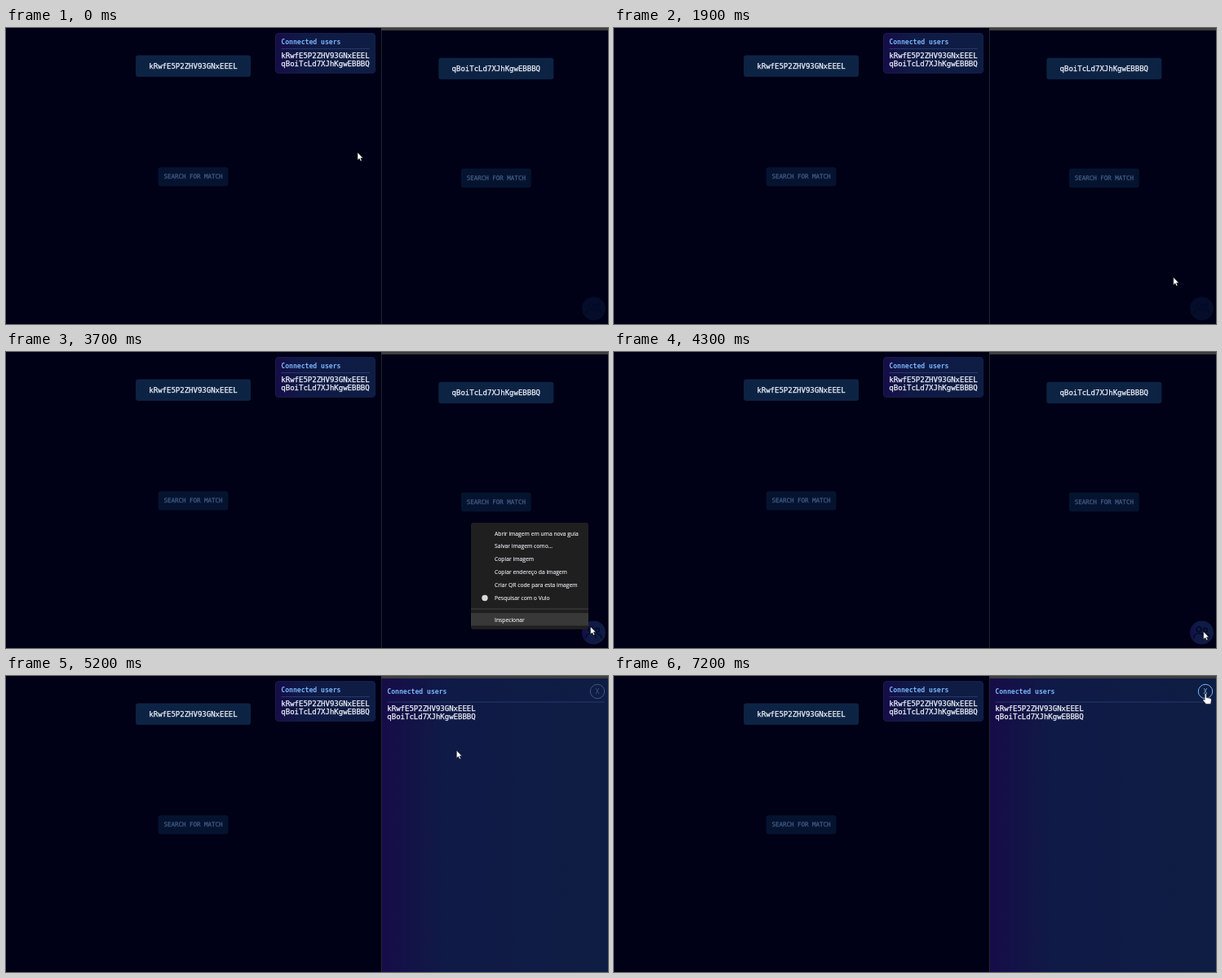
Animation of 738 by 364 pixels, one loop 8 s. Source, as an HTML page:

```html
<!DOCTYPE html>
<html lang="en">
<head>
<meta charset="utf-8">
<style>
html, body { margin: 0; width: 100%; height: 100%; overflow: hidden; background: #000016; }
svg { display: block; width: 738px; height: 364px; cursor: default; }
text { dominant-baseline: central; font: 9px "DejaVu Sans Mono", monospace; fill: #f0f3fa; stroke: #f0f3fa; stroke-width: .25; }
.title { font-size: 8.1px; font-weight: bold; fill: #78b4f8; stroke: none; }
.button { font-size: 7.5px; fill: #435d88; stroke: #435d88; }
.mid { text-anchor: middle; }
#menu text { font: 6.75px "Open Sans", "Noto Sans", sans-serif; stroke-width: .12; }
#close text { font-size: 8px; fill: currentColor; stroke: none; }
.rule { stroke: #26376a; }
.pointer { fill: #fff; stroke: #111; stroke-width: .5; stroke-linejoin: round; }
</style>
</head>
<body>
<svg viewBox="0 0 738 364">
  <defs>
    <linearGradient id="fade">
      <stop stop-color="#160c48"/><stop offset=".27" stop-color="#0f1a46"/><stop offset="1" stop-color="#0e1d43"/>
    </linearGradient>
  </defs>
  <rect width="738" height="364" fill="#000016"/>
  <g id="pages"></g>
  <rect x="330.5" y="6.5" width="122" height="49" rx="3.5" fill="url(#fade)" stroke="#151d4a"/>
  <g id="users"></g>
  <g id="round">
    <circle id="disc" cx="720.5" cy="345" r="14.5"/>
    <g fill="none" stroke="#040a28" stroke-width="1.6">
      <circle cx="717" cy="341" r="3"/><circle cx="725" cy="342" r="2.4"/>
      <path d="M711 352q0-6 6-6t6 6M724 347q6 0 6 5"/>
    </g>
  </g>
  <g id="panel">
    <rect x="460" y="3" width="278" height="361" fill="url(#fade)"/>
    <g id="panelUsers"></g>
    <g id="close">
      <circle cx="725" cy="19" r="8.7" fill="none" stroke="currentColor"/>
      <text class="mid" x="725" y="19.3">X</text>
    </g>
  </g>
  <path d="M460.3 0V364" stroke="#27282d"/>
  <rect x="460" width="278" height="3" fill="#3d3d3f"/>
  <g id="menu">
    <rect x="570" y="210" width="144" height="131" rx="3" fill="#1f1f1f"/>
    <rect id="row" x="570" y="321" width="144" height="15.5" fill="#383838"/>
    <path d="M570 316H714" stroke="#444"/>
    <circle cx="587" cy="302.5" r="3.7" fill="#d8d8d8"/>
    <g id="items"></g>
  </g>
  <g id="cursor">
    <path id="arrow" class="pointer" d="M0 0V9.4L2.2 7.5L3.7 10.7L5.2 10L3.8 6.9H6.6Z"/>
    <path id="beam" d="M-1.5-5H1.5M0-5V5M-1.5 5H1.5" fill="none" stroke="#dfe6f5" stroke-width=".8"/>
    <path id="hand" class="pointer" d="M-.8 0Q.3-1 1.2 0V4.5L6 5.4Q7.5 6 7.3 7.5L6.5 12.5H.8L-3 8Q-3.2 6.4-1.8 6.7L-.8 7.6Z"/>
  </g>
</svg>
<script>
const $ = id => document.getElementById(id);
const ids = ["kRwfE5P2ZHV93GNxEEEL", "qBoiTcLd7XJhKgwEBBBQ"];
const label = (x, y, s, cls = "") => `<text x="${x}" y="${y}" class="${cls}">${s}</text>`;
const box = (x, y, w, h, fill) =>
  `<rect x="${x - w / 2}" y="${y - h / 2}" width="${w}" height="${h}" rx="3" fill="${fill}"/>`;

const page = (x, y, buttonY, id) =>
  box(x, y, 141, 26.5, "#0c2344") + label(x, y, id, "mid") +
  box(x, buttonY, 86, 23.3, "#05132f") + label(x, buttonY, "SEARCH FOR MATCH", "mid button");

const userList = (x, y, right, rule) =>
  label(x, y, "Connected users", "title") +
  `<path class="rule" d="M${x} ${y + rule}H${right}"/>` +
  ids.map((id, i) => label(x, y + rule + 8.3 + i * 10, id)).join("");

$("pages").innerHTML = page(229.5, 46.7, 182.8, ids[0]) + page(600.8, 50, 184.5, ids[1]);
$("users").innerHTML = userList(337.3, 17.3, 446, 8.2);
$("panelUsers").innerHTML = userList(467.3, 19.2, 734, 12.8);

const items = ["Abrir imagem em uma nova guia", "Salvar imagem como...", "Copiar imagem",
  "Copiar endereço da imagem", "Criar QR code para esta imagem", "Pesquisar com o Vulo"];
$("items").innerHTML = items.map((s, i) => label(599, 223 + i * 15.8, s)).join("") +
  label(599, 329, "Inspecionar");

// Each move eases out to a point; bend bows its path sideways.
const moves = [
  { from: 0, until: 500, to: [515, 197] },
  { from: 1000, until: 1300, to: [534, 197] },
  { from: 1400, until: 2300, to: [713, 340], bend: [14, -9] },
  { from: 3100, until: 4000, to: [720, 342], bend: [-8, -12] },
  { from: 4100, until: 4400, to: [723, 344] },
  { from: 4600, until: 5500, to: [531, 60] },
  { from: 5500, until: 5800, to: [519, 40] },
  { from: 6200, until: 7100, to: [725, 22], bend: [0, 50] }
];

function place(t) {
  let pos = [431, 153];
  for (const { from, until, to, bend = [0, 0] } of moves) {
    if (t <= from) break;
    const left = 1 - Math.min(1, (t - from) / (until - from));
    const k = 1 - left * left;
    pos = pos.map((p, i) => p + (to[i] - p) * k + bend[i] * Math.sin(Math.PI * k));
  }
  return pos;
}

const show = (id, on) => $(id).style.display = on ? "" : "none";

function draw(now) {
  const t = Math.floor(now % 8000 / 100) * 100;
  const beam = t >= 5800 && t < 6400, hand = t >= 7100;
  $("cursor").setAttribute("transform", `translate(${place(t)})`);
  show("arrow", !beam && !hand);
  show("beam", beam);
  show("hand", hand);
  show("menu", t >= 3000 && t < 4000);
  show("row", t >= 3300);
  show("panel", t >= 4400);
  show("round", t < 4400);
  $("disc").setAttribute("fill", t >= 2300 ? "url(#fade)" : "#050d2b");
  $("close").style.color = t >= 7200 ? "#78b4f8" : "#405683";
}

const start = performance.now();
function tick() {
  draw(performance.now() - start);
  requestAnimationFrame(tick);
}
tick();
</script>
</body>
</html>
```
